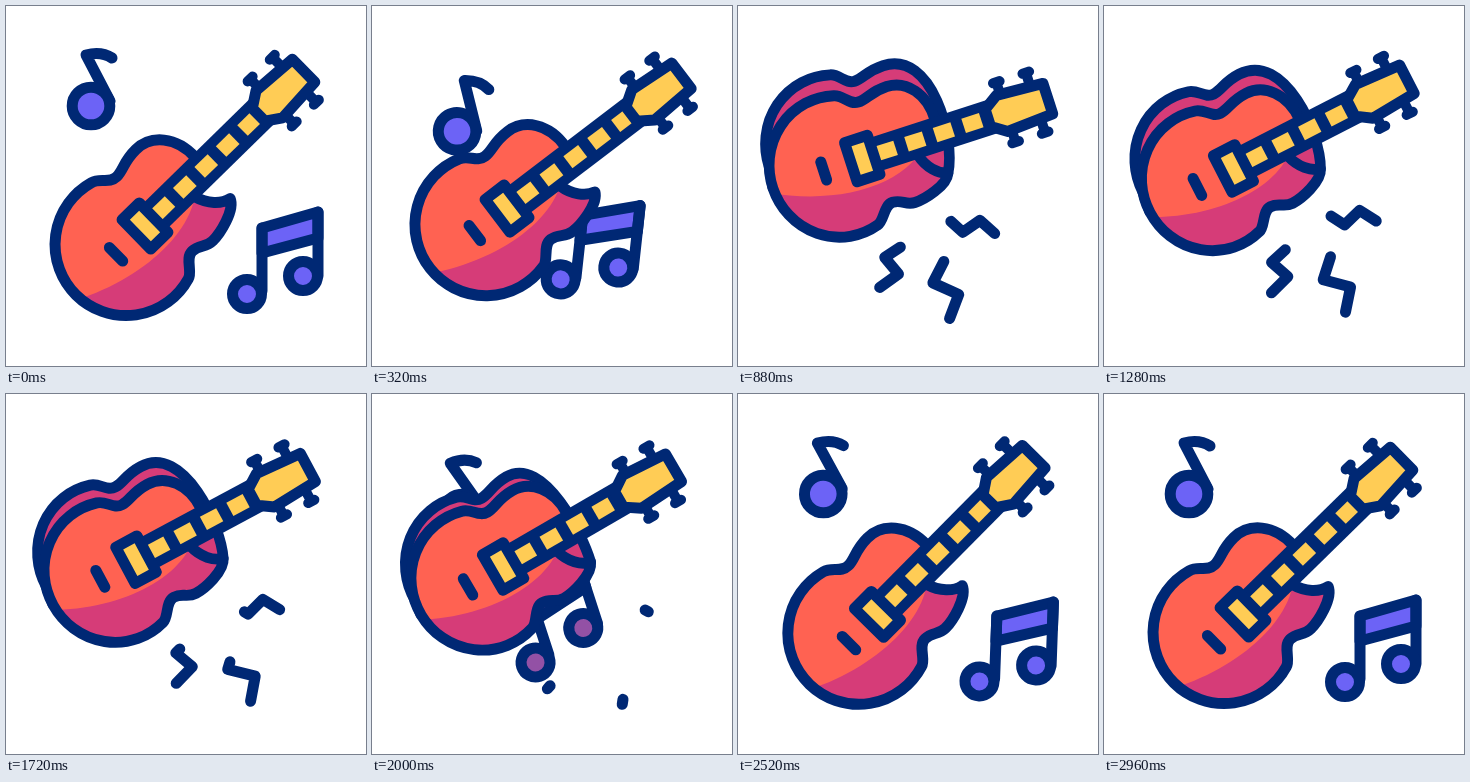
Write an HTML page that moves like this. It is 360 px wide and 360 px high and loops after 3 s.

```html
<!DOCTYPE html>
<html lang="en">
<head>
<meta charset="utf-8">
<title>Guitar and notes</title>
<style>
  html, body { margin: 0; width: 100%; height: 100%; overflow: hidden; background: #fff; }
  svg { display: block; width: 100vw; height: 100vh; }
  .line { stroke: #002874; stroke-width: 11; stroke-linecap: round; stroke-linejoin: round; fill: none; }
  .orange { fill: #ff6252; }
  .pink { fill: #d63c78; }
  .gold { fill: #ffcc55; }
  .navy { fill: #002874; }
  #pegs .line { stroke-width: 10; }
</style>
</head>
<body>
<svg viewBox="0 0 360 360">
  <defs><clipPath id="bodyClip"><path class="outline"/></clipPath></defs>

  <g id="single">
    <path class="line" d="M19 -5 L-5 -51 Q10 -55 21 -48"/>
    <circle class="line note" r="18.8"/>
  </g>

  <g id="pair">
    <path class="line note" d="M-13 -57 L43 -73 V-47 L-13 -32 Z"/>
    <path class="line" d="M-13 6 V-57 M43 -9 V-73"/>
    <circle class="line note" cx="-28" cy="9" r="14.5"/>
    <circle class="line note" cx="28" cy="-9" r="14.5"/>
  </g>

  <!-- x runs along the neck, the origin is the pickup -->
  <g id="guitar">
    <g id="sparks">
      <path class="line" pathLength="1" d="M9 96 L-9 101 L-1 121 L-23 128"/>
      <path class="line" pathLength="1" d="M46 123 L29 140 L50 159 L34 179"/>
      <path class="line" pathLength="1" d="M65 87 L73 101 L93 95 L103 112"/>
    </g>
    <g id="body">
      <path id="back" class="line pink"/>
      <path class="outline orange"/>
      <path class="pink" clip-path="url(#bodyClip)" d="M-120 -6 C-50 38 40 43 70 0 H130 V130 H-120 Z"/>
      <path class="outline line"/>
    </g>
    <path class="line" d="M-40.5 -9.5 V9.5"/>
    <rect id="neck" class="navy" y="-17.5" height="35"/>
    <g id="frets"></g>
    <rect class="line gold" x="-12" y="-20.5" width="24" height="41"/>
    <g id="head">
      <g id="pegs"></g>
      <path class="line gold" d="M159 -9 L174 -19 L222 -16 V16 L174 19 L159 9 Z"/>
    </g>
  </g>
</svg>
<script>
const LOOP = 3000, STEP = 40, REST = 2960;
const $ = id => document.getElementById(id);
const all = selector => document.querySelectorAll(selector);

const lerp = (a, b, f) => a + (b - a) * f;
const ramp = (v, a, b) => Math.min(1, Math.max(0, (v - a) / (b - a)));
const smooth = (v, a, b) => { const u = ramp(v, a, b); return u * u * (3 - 2 * u); };
const cubic = (v, a, b) => {
  const u = ramp(v, a, b);
  return u < .5 ? 4 * u ** 3 : 1 - 4 * (1 - u) ** 3;
};

// A swing in degrees that dies away before the loop ends.
function swing(t, start) {
  const x = Math.max(0, t - start), fade = 1 - ramp(t, start, REST);
  return -33 * Math.sin(Math.PI * x / 600) * fade * fade;
}

// How far the guitar leans: 0 upright, 1 held low, more while it overshoots.
const lean = t => 1.72 * cubic(t, 40, 740) - .72 * smooth(t, 740, 1400)
  - cubic(t, 1824, 2395) + .004 * swing(t, 2300);

// How far a note has gone behind the guitar.
const hiding = t => cubic(t, 16, 656) - cubic(t, 1818, 2138);

// Upper bout, from its crown down to the waist and the lower bout.
const WAIST = 'c-18 0 -23 6 -33 6 s-12 -11 -22 -13.5';
const OUTLINE = `M84 -14 C85 -42 68 -61 47 -61 ${WAIST} A71 71 0 1 0 -6 68
  C2 66 6 51 16 51 S28 58 38 58 S75 52 80 40 C70 38 60 28 56 14 Z`;

// The far edge of the body: the same outline lifted, with the cutaway bridged.
function backPath(k) {
  const top = -61 - 21 * k;
  return `M80 40 C${60 + 38 * k} ${20 - 10 * k} ${68 + 36 * k} ${top} ${47 + 3 * k} ${top}
    ${WAIST} a71 71 0 0 0 -89.5 68.5 L-97.5 0 Z`;
}

function add(parent, tag, attrs) {
  const el = document.createElementNS('http://www.w3.org/2000/svg', tag);
  for (const k in attrs) el.setAttribute(k, attrs[k]);
  $(parent).appendChild(el);
}

all('.outline').forEach(el => el.setAttribute('d', OUTLINE));
for (let i = 0; i < 5; i++)
  add('frets', 'rect', { class: 'gold', x: 16.5 + 30 * i, y: -7.5, width: 18.5, height: 15 });
for (const x of [178, 209])
  for (const side of [-1, 1])
    add('pegs', 'path', { class: 'line', d: `M${x - 3.5} ${31.5 * side} h7 M${x} ${31 * side} V0` });

const show = (el, on) => el.setAttribute('visibility', on ? 'visible' : 'hidden');
const move = (id, transform) => $(id).setAttribute('transform', transform);

function drawGuitar(t) {
  const q = lean(t), depth = smooth(q, .4, 1.15), short = 27 * smooth(q, .3, 1);
  const y = 220 - 7 * q - 56 * smooth(q, 0, 1.33);
  move('guitar', `translate(${139 - 9 * q} ${y}) rotate(${16.2 * q - 44.4})`);
  move('body', `scale(${1 - .035 * depth} 1)`);
  move('head', `translate(${-short} 0)`);
  $('neck').setAttribute('width', 165 - short);
  $('back').setAttribute('d', backPath(depth));
  show($('back'), depth > .02);
}

function drawNotes(t) {
  const n = hiding(t), turn = 14 * Math.sin(Math.PI * n) * (t < 1500) + swing(t, 1950);
  move('single', `translate(${lerp(85, 94, n)} ${lerp(100, 160, n)}) rotate(${turn} 0 -16)`);

  const m = hiding(t - 20), tilt = 7 * Math.sin(Math.PI * m) * (t < 1500) + swing(t, 1840);
  move('pair', `translate(${lerp(269, 115, m)} ${lerp(279, 172, m * m)}) rotate(${tilt} -13 22)`);

  const tint = smooth(m, .35, .6);
  const rgb = [[108, 180], [99, 65], [246, 95]].map(([a, b]) => Math.round(lerp(a, b, tint)));
  all('.note').forEach(el => el.style.fill = `rgb(${rgb})`);
}

function drawSparks(t) {
  const end = ramp(t, 560, 760), start = ramp(t, 1640, 2025);
  for (const s of $('sparks').children) {
    show(s, end > start);
    s.setAttribute('stroke-dasharray', `${Math.max(end - start, .001)} 3`);
    s.setAttribute('stroke-dashoffset', -start);
  }
}

const begin = performance.now();
function tick() {
  const now = (performance.now() - begin) % LOOP;
  const t = Math.floor(now / STEP) * STEP;
  drawGuitar(t);
  drawNotes(t);
  drawSparks(t);
  requestAnimationFrame(tick);
}
tick();
</script>
</body>
</html>
```
